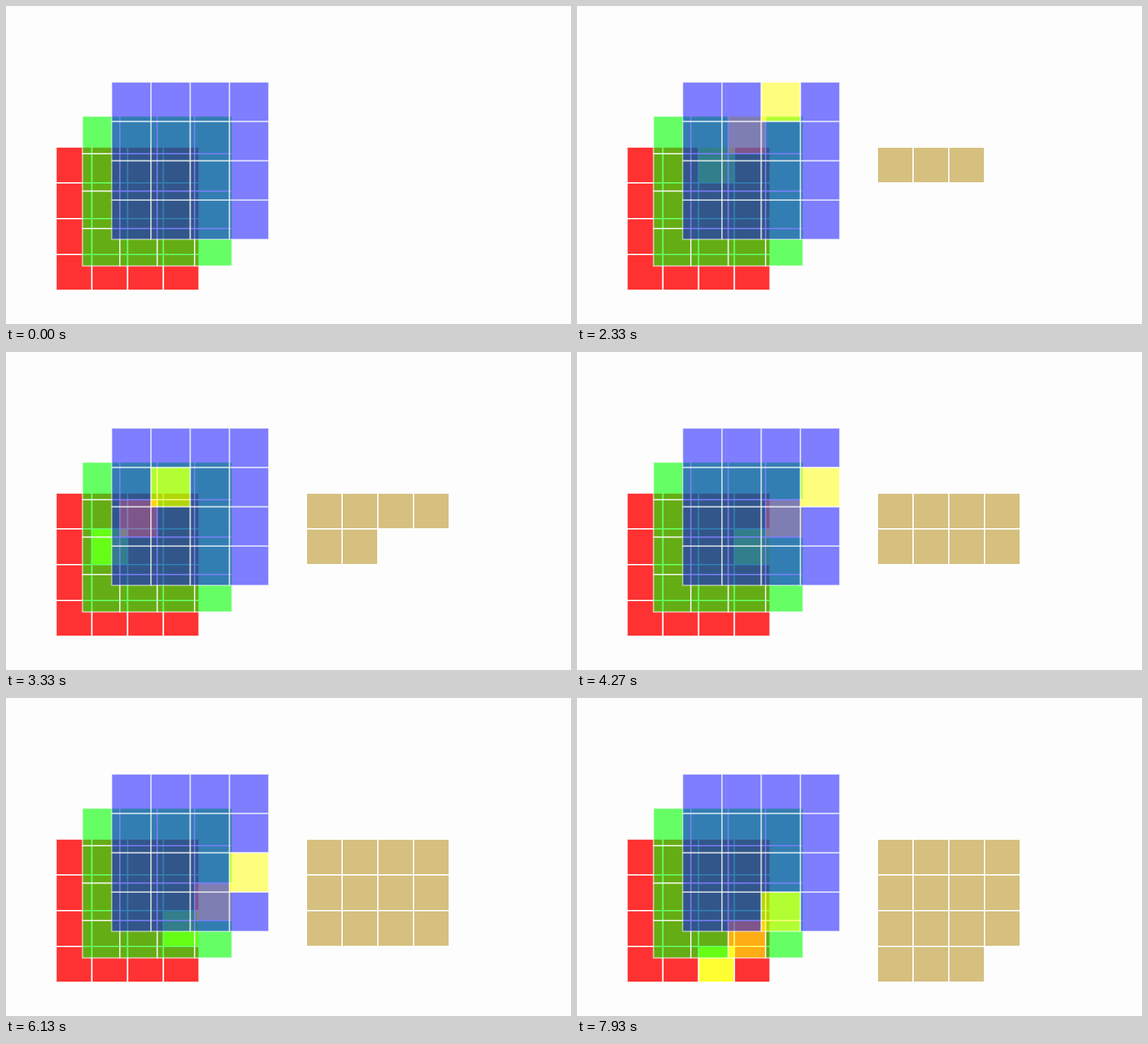
Recreate the animation shown at these times as an HTML page with a canvas. Size 854x480 px, loop 8 s.

```html
<!DOCTYPE html>
<html lang="en">
<head>
<meta charset="utf-8">
<title>Stacked grids</title>
<style>
  html, body { margin: 0; width: 100%; height: 100%; overflow: hidden; background: #fdfdfd; }
  canvas { display: block; }
</style>
</head>
<body>
<canvas id="stage" width="854" height="480"></canvas>
<script>
const ctx = document.getElementById('stage').getContext('2d');

const LOOP = 8000;
const START = 990;          // first cell lights up
const STEP = 7000 / 15;     // time per cell
const N = 4;
const LAST = 14;
const PAPER = '#fdfdfd';
const LINE = '#ffffff';
const YELLOW = '#ffff00';

// Layers from back to front
const layers = [
  { x: 75.7, y: 213, size: 54, color: '#ff0000', alpha: 0.8 },
  { x: 115.6, y: 166.4, size: 56.5, color: '#00ff00', alpha: 0.6 },
  { x: 159.8, y: 115, size: 59.3, color: '#0000ff', alpha: 0.5 }
];
const result = { x: 454, y: 213, size: 54, color: '#d5c07f', alpha: 1 };

function cellOrigin(grid, i) {
  return [
    grid.x + (i % N) * grid.size,
    grid.y + Math.floor(i / N) * grid.size
  ];
}

// Neighbouring cells both stroke their shared edge, so inner lines are denser.
function drawGrid(grid, count, active) {
  const { size } = grid;
  ctx.globalAlpha = grid.alpha;
  for (let i = 0; i < count; i++) {
    ctx.fillStyle = i === active ? YELLOW : grid.color;
    ctx.fillRect(...cellOrigin(grid, i), size, size);
  }
  ctx.strokeStyle = LINE;
  ctx.lineWidth = 2;
  for (let i = 0; i < count; i++) {
    ctx.strokeRect(...cellOrigin(grid, i), size, size);
  }
}

function draw(time) {
  const active = Math.min(LAST, Math.floor((time - START) / STEP));
  ctx.globalAlpha = 1;
  ctx.fillStyle = PAPER;
  ctx.fillRect(0, 0, 854, 480);
  for (const grid of layers) drawGrid(grid, N * N, active);
  drawGrid(result, Math.max(0, active + 1), -1);
}

const origin = performance.now();
function tick() {
  draw((performance.now() - origin) % LOOP);
  requestAnimationFrame(tick);
}
tick();
</script>
</body>
</html>
```
